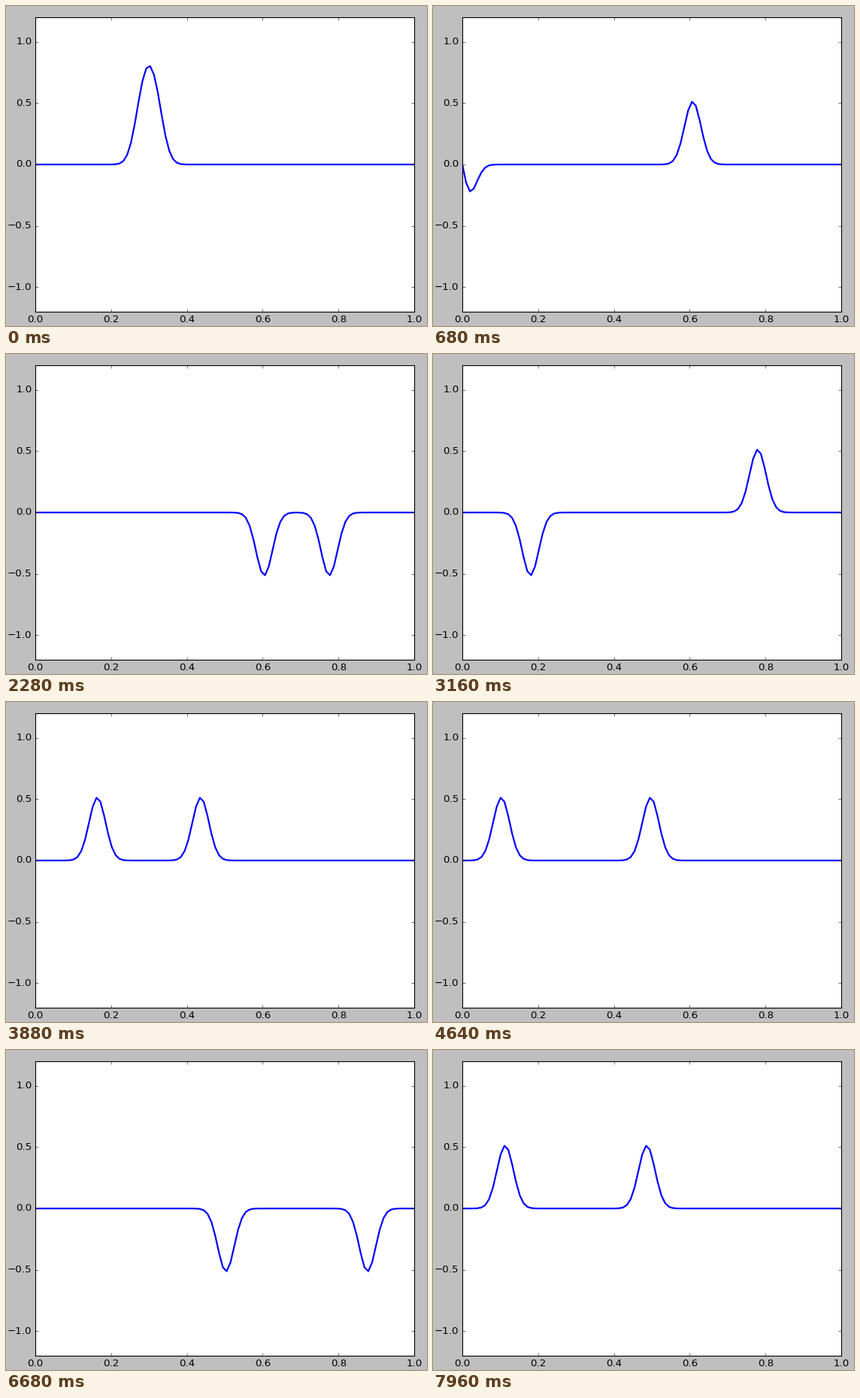
Write a matplotlib script that moves like this. It is 560x426 px and loops after 8 s.

```python
import numpy as np
import matplotlib.pyplot as plt
from matplotlib.animation import FuncAnimation

W, H, DPI = 560, 426, 80
LEFT, RIGHT, TOP, BOTTOM = 39, 543, 15, 407  # axes edges in pixels

FRAMES, INTERVAL = 200, 40   # shown frames, ms per frame
STEPS = 200                  # wave steps before the pulse starts again
STEP_MS, DELAY_MS = 20.95, 26

plt.style.use("classic")
plt.rcParams.update({
    "font.family": "DejaVu Sans",
    "figure.facecolor": "0.75",
    "savefig.facecolor": "0.75",
    "savefig.dpi": "figure",
})


def simulate(x):
    """Leapfrog wave equation at unit Courant number with fixed ends."""
    start = np.exp(-(x - 0.3) ** 2 / 0.001)
    waves = [start, start.copy()]
    while len(waves) < STEPS:
        prev, cur = waves[-2:]
        new = np.zeros_like(x)
        new[1:-2] = cur[2:-1] + cur[:-3] - prev[1:-2]
        waves.append(new)
    return waves


x = np.linspace(0, 1, 100)
waves = simulate(x)

fig = plt.figure(figsize=(W / DPI, H / DPI), dpi=DPI)
ax = fig.add_axes([LEFT / W, 1 - BOTTOM / H, (RIGHT - LEFT) / W, (BOTTOM - TOP) / H])
ax.set_xlim(0, 1)
ax.set_ylim(-1.2, 1.2)
ax.set_xticks(np.linspace(0, 1, 6))
ax.set_yticks(np.linspace(-1, 1, 5))
line, = ax.plot(x, waves[0], color="blue", lw=2)


def update(frame):
    step = int((frame * INTERVAL - DELAY_MS) // STEP_MS) % STEPS
    line.set_ydata(waves[step])
    return line,


anim = FuncAnimation(fig, update, frames=FRAMES, interval=INTERVAL,
                     repeat=True, repeat_delay=0, blit=False)
plt.show()
```
